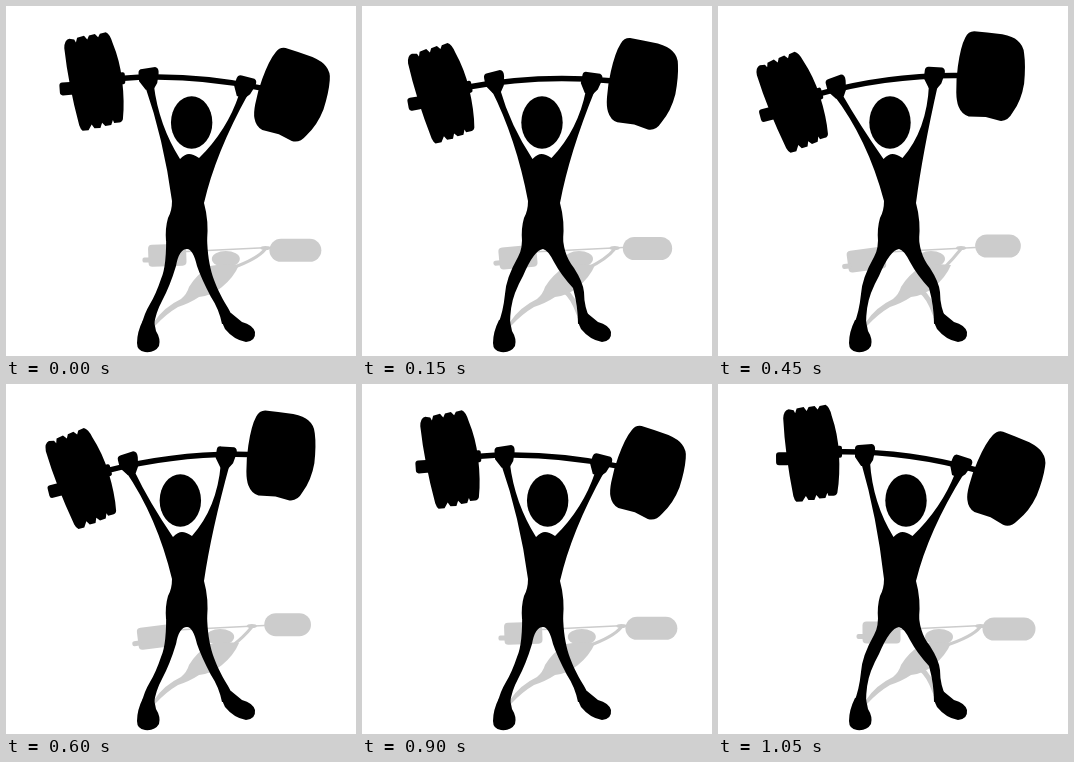
Recreate the animation shown at these times as an HTML page. Size 350x350 px, loop 1.2 s.

```html
<!DOCTYPE html>
<html lang="en">
<head>
<meta charset="utf-8">
<title>Weightlifter</title>
<style>
  html, body { margin: 0; width: 100%; height: 100%; overflow: hidden; background: #fff; }
  svg { display: block; width: 100%; height: 100%; }
</style>
</head>
<body>
<svg id="stage" viewBox="0 0 350 350"></svg>
<script>
const STEP = 150, STEPS = 8;
const GRAY = '#ccc';

// The barrel and fist are drawn around their own centres, the plates around (93, 69).
const BARREL = `M-34 16Q-34 2-32-10Q-29-30-24-39Q-21-45-15-45L-2-43.500 13-41.500Q24-39 28-35Q34-30 34.500-22
  Q36-10 34 8Q31 25 22 37Q17 46 9 45L-5 41-22 40Q-29 38-32 30Q-34 25-34 16Z`;
const PLATES = `M65.500 34Q66 26 71 25L76 26 77.500 29 79 24.500 86 23 89 27 91 23 97 22 100 25.500 102 22
  108 21Q112 23 114 32Q120 50 121 70Q122 92 119 109Q118 112 115 112L110 112 109 109 107 114
  101 114.500 98 111 96 116 90 116 87.500 112 84 117.500 78 117.500Q76 116 75 112Q67 70 65.500 34Z`;
const FIST = 'M-10-6Q-10-10-6-10L7-11Q11-10 10-4L8 5 4 11-4 11-10 2Z';
const FEET = `M137 314Q131 326 131 337Q131 345 139 346Q149 347 153 340Q155 333 150 325L148 315Z
  M216 307Q215 316 219 323Q228 334 240 336Q250 335 249 326Q247 319 236 316L225 307Z`;
const STRAIGHT_LEGS = `M160 225Q161 260 155 273Q150 288 144 298Q138 308 136 318L148 319Q150 306 156 295
  Q164 280 170 260Q173 243 181 243Q187 243 191 260Q195 272 205 291Q213 303 216 318L229 317
  Q226 308 219 297C207 275 201 260 201 225Z`;
const BENT_LEGS = `M160 225Q161 243 156 251Q144 272 143 288Q141 307 136 318L148 319Q148 300 153 287
  Q157 277 161 270Q172 244 181 243Q186 244 192 256Q199 269 211 282Q216 300 216 318L229 315
  Q222 302 222 286Q221 276 212 262Q200 247 201 225Z`;

const path = (d, extra = '') => `<path d="${d}" ${extra}/>`;
const placed = ([x, y], angle, content) =>
  `<g transform="translate(${x} ${y}) rotate(${angle})">${content}</g>`;
const ellipse = ([x, y], rx, ry) => `<ellipse cx="${x}" cy="${y}" rx="${rx}" ry="${ry}"/>`;
const box = (x, y, w, h, r) => `<rect x="${x}" y="${y}" width="${w}" height="${h}" rx="${r}"/>`;
const line = (d, width, color) =>
  path(d, `fill="none" stroke="${color}" stroke-width="${width}" stroke-linecap="round"`);

// A point given relative to a rotated centre.
function attached([cx, cy], angle, x, y) {
  const a = angle * Math.PI / 180, c = Math.cos(a), s = Math.sin(a);
  return [cx + x * c - y * s, cy + x * s + y * c];
}

// s runs from 1 (far right) through 0 to -1 (far left).
function poseAt(s) {
  const bend = (right, mid, left) => mid + (right - left) / 2 * s + ((right + left) / 2 - mid) * s * s;
  return {
    head: [180 + 8 * s, 116.5],
    neck: 179.5 + 5 * s,
    left: [bend(93, 79.5, 74.5), bend(69, 87, 96)],
    leftTilt: bend(-0.5, -10.5, -15),
    right: [280 + 8 * s, bend(95, 78, 70)],
    rightTilt: bend(15, 4, -1),
    fistL: [133 + 14 * s, 76 - 5 * s],
    fistR: [229 + 13 * s, 77 + 5.5 * s],
    shadowL: [157 + 7.5 * s, 251.5 - 2.5 * s],
    shadowR: [285.5 + 5.5 * s, 242.5 + 2.5 * s]
  };
}

function shadow({ shadowL, shadowR: [x, y], leftTilt, head }) {
  const half = x / 3 - 70.5, hand = x * 1.75 - 247;
  return `<g fill="${GRAY}">` +
    placed(shadowL, leftTilt / 2, box(-20, -11.5, 38, 22, 4) + box(-26, 1, 9, 5, 2)) +
    box(x - half, y - 11.5, half * 2, 23, 11.5) +
    line(`M170 246L${x - half} 241.500`, 1.5, GRAY) +
    line(`M${hand} 243Q${hand - 8} 253 226 262`, 3, GRAY) + ellipse([hand, 242], 5, 2) +
    ellipse([head[0] / 2 + 127, 253], 14, 8) +
    path(`M204 260Q218 257 233 259Q228 271 216 281Q205 290 193 291Q184 297 172 301Q160 308 149 320
      L148 316Q158 301 175 293Q181 288 183 281Q190 269 204 260Z`) +
    line('M203 285Q211 291 217 308', 5, GRAY) + '</g>';
}

function body({ neck, fistL: [lx, ly], fistR: [rx, ry] }) {
  return path(`M${lx - 4} ${ly + 7}Q${110 + lx / 3} 133 166 195Q166 205 162 212Q159 222 160 235L201 235
    Q203 215 198 197Q${157 + rx * .22} 147 ${rx + 4} ${ry + 7}L${rx - 5} ${ry + 7}
    Q${88 + rx * .56} 124 ${neck + 10} 152Q${neck + 4} 148 ${neck} 148Q${neck - 4} 148 ${neck - 9} 153
    Q${87 + lx * .46} 119 ${lx + 5} ${ly + 7}Z`);
}

function barbell({ left, leftTilt, right, rightTilt }) {
  const [x1, y1] = attached(left, leftTilt, 26, -1);
  const [x2, y2] = attached(right, rightTilt, -32, -1);
  const plates = path(PLATES) + box(58, 68, 14, 13, 3) + box(117, 62, 7, 12, 2);
  return line(`M${x1} ${y1}Q${(x1 + x2) / 2} ${(y1 + y2) / 2 - 10} ${x2} ${y2}`, 5.5, '#000') +
    placed(left, leftTilt, `<g transform="translate(-93 -69)">${plates}</g>`) +
    placed(right, rightTilt, path(BARREL));
}

function draw(step) {
  const pose = poseAt(Math.cos((step + 1) * 2 * Math.PI / STEPS));
  stage.innerHTML = shadow(pose) + path(step % 2 ? BENT_LEGS : STRAIGHT_LEGS) + path(FEET) +
    body(pose) + ellipse(pose.head, 20.7, 26.3) + barbell(pose) +
    placed(pose.fistL, pose.leftTilt, path(FIST)) +
    placed(pose.fistR, pose.rightTilt + 8, path(FIST));
}

const stage = document.getElementById('stage');
const start = performance.now();
let shown = 0;
draw(shown);
requestAnimationFrame(function tick() {
  const step = Math.floor((performance.now() - start) / STEP) % STEPS;
  if (step !== shown) draw(shown = step);
  requestAnimationFrame(tick);
});
</script>
</body>
</html>
```
